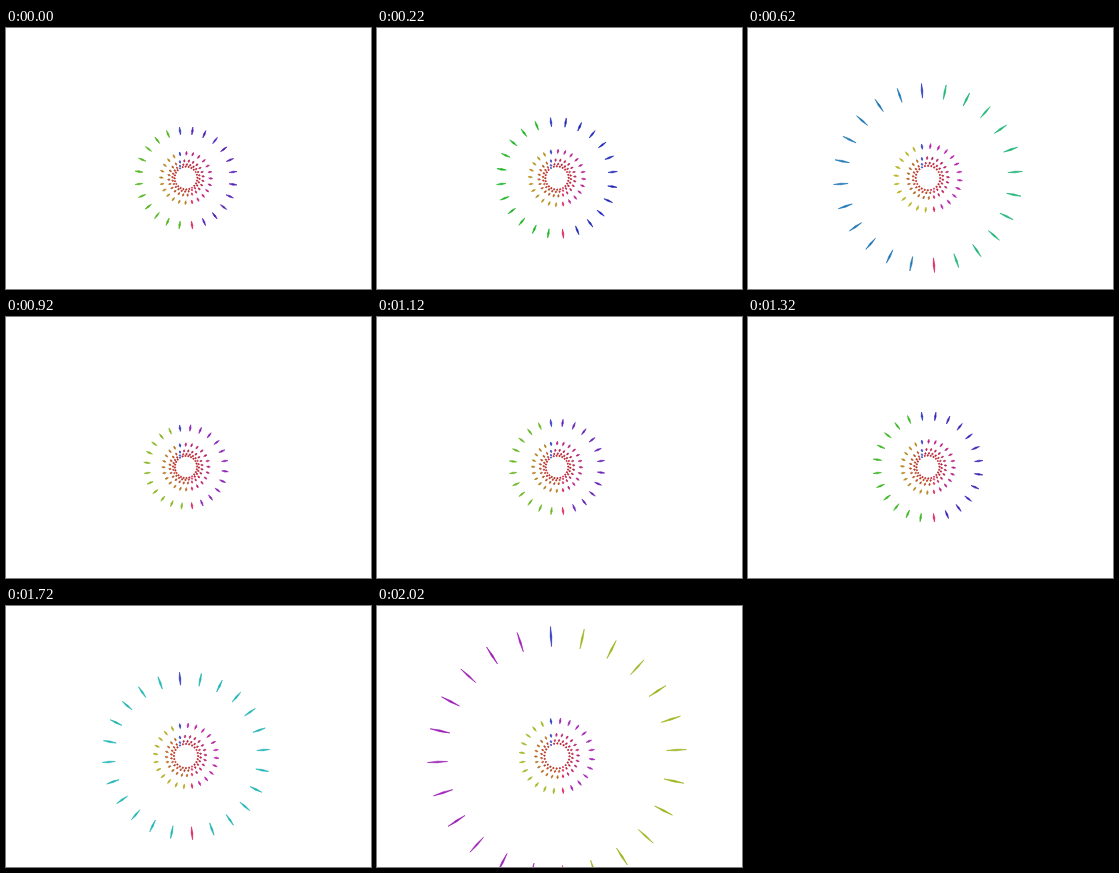
These frames come from a looping animation (365x261 px, 2120 ms). An HTML page with a canvas:

```html
<!DOCTYPE html>
<html lang="en">
<head>
<meta charset="utf-8">
<title>Ring tunnel</title>
<style>
  html, body { margin: 0; width: 100%; height: 100%; overflow: hidden; background: #fff; }
  canvas { display: block; width: 365px; height: 261px; }
</style>
</head>
<body>
<canvas id="stage" width="365" height="261"></canvas>
<script>
const ctx = document.getElementById('stage').getContext('2d');
const LOOP = 2120, FIRST = 120, STEP = 100;
const CENTER = { x: 180, y: 150 }, TOP = 19;
const RINGS = 5, SPOKES = 24;
const GAP = 0.0189;   // depth between rings
const NEAR = 0.006;   // rings closer than this leave the view

// [step, depth of the leading ring]; a ring's radius is 1 / depth
const DEPTHS = [
  [0, 0.0196], [4, 0.01351], [6, 0.01058], [8, 0.00676], [9, 0.0049],
  [13, -0.00072], [17, -0.00696], [18, -0.00826], [20, -0.01118]
];

function depthAt(step) {
  const i = Math.max(1, DEPTHS.findIndex(([s]) => s >= step));
  const [s0, d0] = DEPTHS[i - 1], [s1, d1] = DEPTHS[i];
  let depth = d0 + (d1 - d0) * (step - s0) / (s1 - s0);
  while (depth < NEAR) depth += GAP;
  return depth;
}

function spokeColor(k, radius) {
  if (k === 0) return 'hsl(235, 66%, 45%)';
  if (k === SPOKES / 2) return 'hsl(342, 76%, 49%)';
  const hue = 2.415 * radius - 23;
  return `hsl(${k < SPOKES / 2 ? 360 - hue : hue}, 70%, 42%)`;
}

function drawSpoke(k, radius) {
  const inner = radius * 0.845, mid = (radius + inner) / 2;
  const lean = Math.min(0.5, radius * 0.01);
  ctx.save();
  ctx.rotate(k * 2 * Math.PI / SPOKES);
  ctx.translate(-6, 0);
  ctx.beginPath();
  ctx.moveTo(-lean, -radius);
  ctx.lineTo(0.8, -mid);
  ctx.lineTo(lean, -inner);
  ctx.lineTo(-0.8, -mid);
  ctx.closePath();
  ctx.fillStyle = ctx.strokeStyle = spokeColor(k, radius);
  ctx.lineWidth = 0.6;
  ctx.fill();
  ctx.stroke();
  ctx.restore();
}

function draw(time) {
  const t = time % LOOP;
  const step = t < FIRST ? 0 : 1 + Math.floor((t - FIRST) / STEP);
  const depth = depthAt(step);
  ctx.fillStyle = '#fff';
  ctx.fillRect(0, 0, 365, 261);
  ctx.save();
  ctx.beginPath();
  ctx.rect(0, TOP, 365, 261 - TOP);
  ctx.clip();
  ctx.translate(CENTER.x, CENTER.y);
  for (let ring = RINGS - 1; ring >= 0; ring--) {
    const radius = 1 / (depth + ring * GAP);
    for (let k = 0; k < SPOKES; k++) drawSpoke(k, radius);
  }
  ctx.restore();
}

const start = performance.now();
function tick() {
  draw(performance.now() - start);
  requestAnimationFrame(tick);
}
tick();
</script>
</body>
</html>
```
